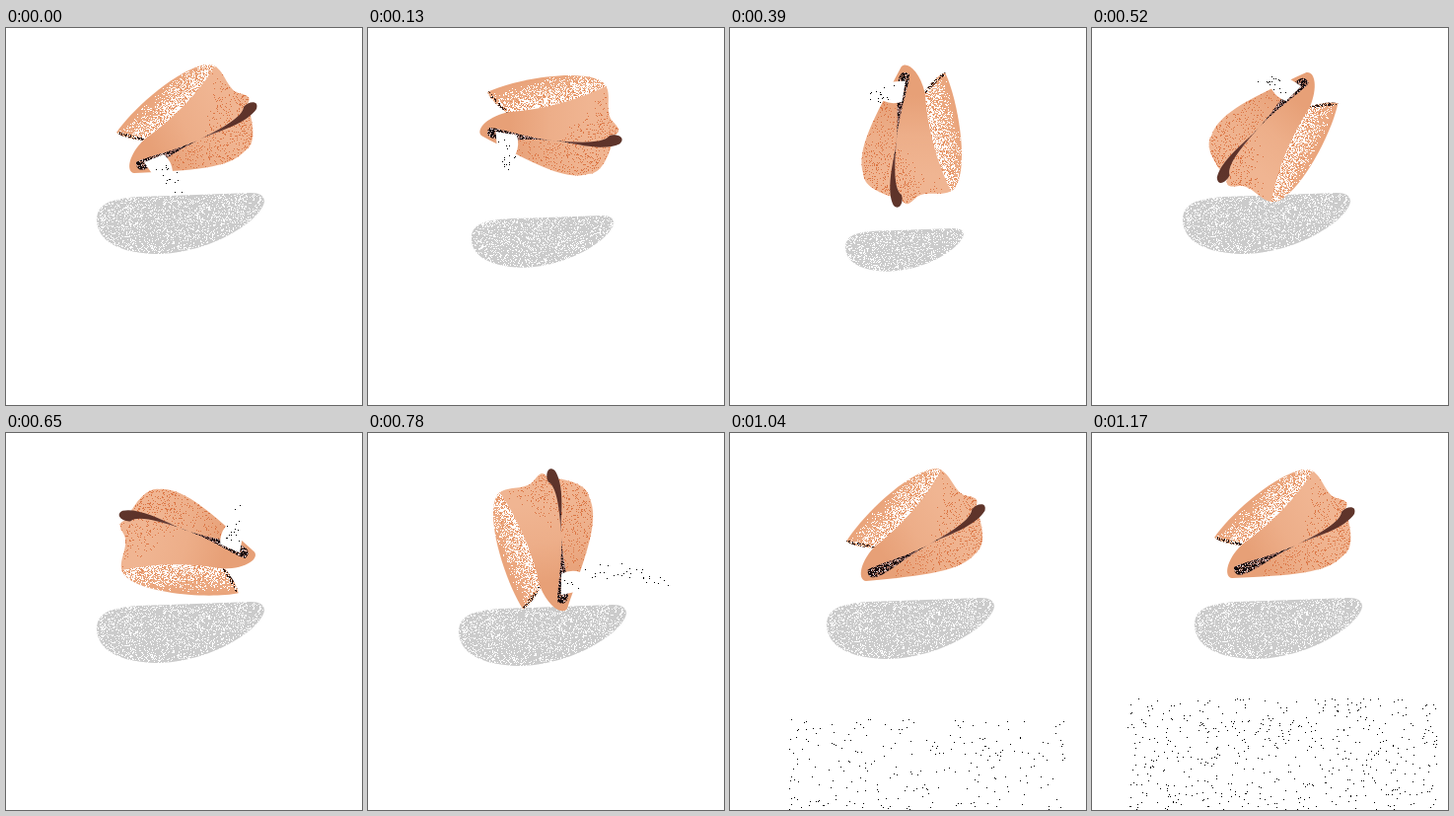
Recreate the animation shown at these times as an HTML page with a canvas. Size 361x382 px, loop 1300 ms.

```html
<!DOCTYPE html>
<html lang="en">
<head>
<meta charset="utf-8">
<title>Tumbling bean</title>
<style>
html, body { margin: 0; width: 100%; height: 100%; overflow: hidden; background: #fff; }
canvas { display: block; width: 361px; height: 382px; }
</style>
</head>
<body>
<canvas id="stage" width="361" height="382"></canvas>
<script>
const W = 361, H = 382, STEP = 130;

// Shapes share one coordinate system; the bean turns about (189, 110).
const flap = new Path2D('M112 106C125 86 168 46 198 38Q211 35 215 42Q184 82 140 114Q120 112 112 106Z');
const body = new Path2D('M212 39C222 44 224 62 236 66C248 69 248 71 245 78C253 103 252 118 243 124C226 143 190 144 130 147C122 146 123 130 140 113Q184 82 212 39Z');
const seam = new Path2D('M132 136C142 130 170 126 200 111C220 101 240 90 241 80C246 74 257 73 254 82C246 94 225 102 205 109C180 119 160 135 147 141C138 145 132 145 132 136Z');
const bite = new Path2D('M140 136L160 128Q168 135 169 145L171 153H151L147 146Z');
const shadow = new Path2D('M92 195C92 172 118 171 165 170L248 167Q262 167 262 176C258 196 206 229 152 229C115 228 93 216 92 195Z');

// turn, centre x, centre y, shadow top, shadow scale
const steps = [
  [0, 189, 110, 167],
  [31, 185, 108, 190, 0.85],
  [62.3, 180.5, 107, 212, 0.685],
  [121, 175, 109, 203, 0.705],
  [158, 176.5, 101.5, 167],
  [225, 184, 105, 171],
  [292.6, 190.5, 109, 174],
  [350.5, 189.5, 110, 168],
  [357, 195, 110, 167],
  [360, 201, 110, 167]
];
const BURST = 6, GONE = 7, FALL = 8;

function seeded(seed) {
  return () => {
    seed = seed + 0x6D2B79F5 | 0;
    let t = Math.imul(seed ^ seed >>> 15, 1 | seed);
    t = t + Math.imul(t ^ t >>> 7, 61 | t) ^ t;
    return ((t ^ t >>> 14) >>> 0) / 4294967296;
  };
}

const clamp = v => Math.max(0, Math.min(1, v));
const seamY = x => 138 - (x - 133) * 0.37 - Math.max(0, x - 195) * 0.3;

// Grain lies on whole stage pixels, with density given in shape coordinates.
function grain(c, m, path, box, color, density, rand) {
  const inv = m.inverse();
  c.save();
  c.setTransform(m);
  c.clip(path);
  c.resetTransform();
  c.fillStyle = color;
  const [x0, y0, x1, y1] = box.map(Math.round);
  for (let y = y0; y < y1; y++) {
    for (let x = x0; x < x1; x++) {
      const px = x + 0.5, py = y + 0.5;
      const lx = inv.a * px + inv.c * py + inv.e;
      const ly = inv.b * px + inv.d * py + inv.f;
      if (rand() < density(lx, ly)) c.fillRect(x, y, 1, 1);
    }
  }
  c.restore();
}

function blend(c, x0, y0, x1, y1, ...colors) {
  const g = c.createLinearGradient(x0, y0, x1, y1);
  colors.forEach((color, i) => g.addColorStop(i / (colors.length - 1), color));
  return g;
}

function drawBean(c, m, box, bitten, rand) {
  const fill = (path, style) => {
    c.setTransform(m);
    c.fillStyle = style;
    c.fill(path);
    c.resetTransform();
  };
  const dots = (path, color, density) => grain(c, m, path, box, color, density, rand);

  fill(flap, blend(c, 148, 66, 174, 92, '#e9a37a', '#f0b590'));
  dots(flap, '#fff', (x, y) => 0.78 * clamp(1.08 - (257 - x - y) / 36));
  dots(flap, '#e38d5c', (x, y) => 0.22 * clamp((x + y - 228) / 20));
  dots(flap, '#2a1512', (x, y) => y > 104.5 + (x - 112) * 0.27 ? 0.45 : 0);

  fill(body, blend(c, 152, 128, 222, 88, '#e7a077', '#edae89', '#f0b592'));
  dots(body, '#db7645', (x, y) => {
    if (y > seamY(x)) return x > 160 ? 0.05 + 0.1 * clamp((x - 165) / 80) : 0;
    return 0.14 * clamp((x + y * 0.2 - 218) / 25);
  });

  fill(seam, blend(c, 133, 140, 252, 80,
    'rgba(90,55,52,.45)', 'rgba(115,82,84,.75)', '#7d5a58', '#5c3129', '#5f352b'));
  dots(seam, '#150b0e', x => 0.7 * clamp(1 - (x - 138) / 80));
  dots(seam, '#d9c4c4', x => 0.14 * clamp((205 - x) / 40));

  if (bitten) fill(bite, '#fff');
}

function dot(c, x, y) {
  c.fillRect(Math.floor(x), Math.floor(y), 1, 1);
}

// Dots scattered around a quadratic curve from a over b to e.
function spray(c, count, a, b, e, rand) {
  for (let i = 0; i < count; i++) {
    const t = rand();
    const at = k => (1 - t) ** 2 * a[k] + 2 * t * (1 - t) * b[k] + t * t * e[k];
    dot(c, at(0) + rand() * 15 - 7.5, at(1) + rand() * 15 - 7.5);
  }
}

function rain(c, count, left, top, right, rand) {
  for (let i = 0; i < count; i++) {
    dot(c, left + rand() * (right - left), top + rand() * (H - top));
  }
}

function drawDots(c, m, i, rand) {
  c.fillStyle = '#000';
  if (i < BURST) {
    const [a, b, e] = [[155, 141], [164, 151], [173, 161]].map(([x, y]) => {
      const p = m.transformPoint(new DOMPoint(x, y));
      return [p.x, p.y];
    });
    spray(c, 17, a, b, e, rand);
  } else if (i === BURST) {
    spray(c, 38, [199, 158], [255, 122], [298, 156], rand);
  } else if (i === GONE) {
    spray(c, 32, [315, 175], [349, 247], [276, 311], rand);
  } else if (i === FALL) {
    rain(c, 250, 60, 290, 340, rand);
  } else {
    rain(c, 560, 36, 269, 350, rand);
  }
}

function render([turn, cx, cy, top, scale = 1], i) {
  const cv = document.createElement('canvas');
  cv.width = W;
  cv.height = H;
  const c = cv.getContext('2d');
  c.fillStyle = '#fff';
  c.fillRect(0, 0, W, H);

  const left = 92 + (1 - scale) * 85 + (i >= FALL ? cx - 189 : 0);
  const ground = new DOMMatrix().translate(left, top).scale(scale).translate(-92, -167);
  grain(c, ground, shadow, [left, top, left + 171 * scale, top + 64 * scale],
    '#cbcbcb', () => 0.77, seeded(11));

  const pose = new DOMMatrix().translate(cx, cy).rotate(turn).translate(-189, -110);
  drawBean(c, pose, [cx - 82, cy - 82, cx + 82, cy + 82], i < GONE, seeded(29));
  drawDots(c, pose, i, seeded(70 + i));
  return cv;
}

const views = steps.map(render);
const stage = document.getElementById('stage').getContext('2d');
const start = performance.now();
let shown = -1;

function tick() {
  const i = Math.floor((performance.now() - start) / STEP) % views.length;
  if (i !== shown) {
    stage.drawImage(views[i], 0, 0);
    shown = i;
  }
  requestAnimationFrame(tick);
}
tick();
</script>
</body>
</html>
```
